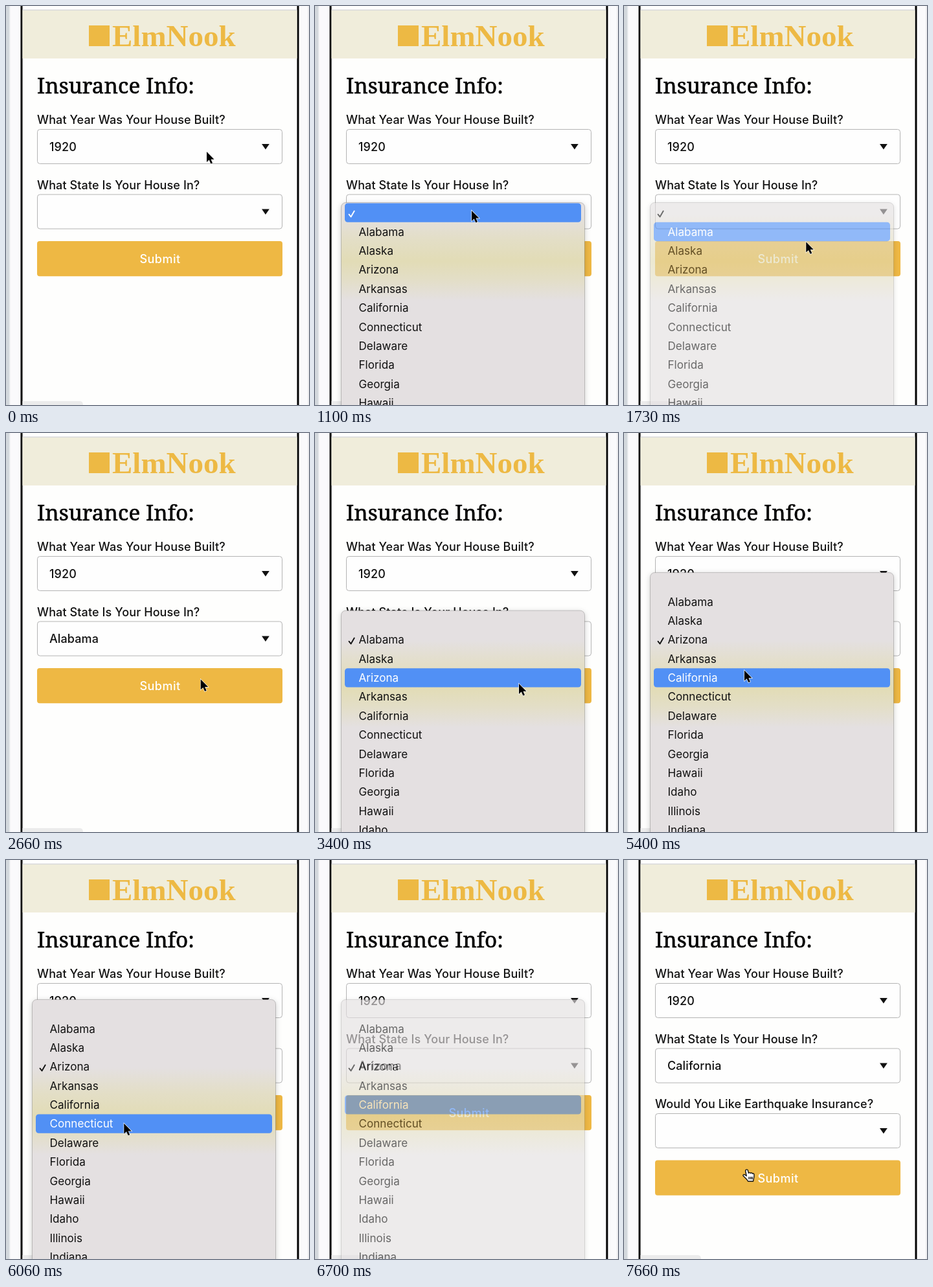
Recreate the animation shown at these times as an HTML page. Size 468 px wide and 616 px high, loop 8 s.

```html
<!DOCTYPE html>
<html lang="en">
<head>
<meta charset="utf-8">
<title>Insurance form</title>
<style>
  html, body { margin: 0; width: 100%; height: 100%; overflow: hidden; background: #fdfdfd; }
  svg { display: block; width: 468px; height: 616px; }
  text { font: 500 18px Inter, "Open Sans", sans-serif; letter-spacing: .1px; fill: #111; }
  .brand { font: bold 47px "Liberation Serif", serif; letter-spacing: 0; fill: #edb944; }
  .title { font: 33.3px "Noto Serif", serif; letter-spacing: 0; fill: #000; stroke: #000; stroke-width: .6; }
  .submit { fill: #fff; letter-spacing: .5px; text-anchor: middle; }
  .menu text { font-size: 17.1px; font-weight: 400; letter-spacing: 0; }
  .field { fill: #fefefe; stroke: #b4b4b4; }
  .panel { fill: url(#glass); stroke: #00000030; filter: drop-shadow(0 2px 4px #0003); }
  .check { fill: none; stroke: #111; stroke-width: 1.9; stroke-linecap: round; stroke-linejoin: round; }
</style>
</head>
<body>
<svg id="stage" viewBox="0 0 468 616">
  <defs>
    <linearGradient id="glass" gradientUnits="userSpaceOnUse" x1="0" y1="320" x2="0" y2="455">
      <stop offset="0" stop-color="#e4e0e1"/>
      <stop offset=".3" stop-color="#e3dec6"/>
      <stop offset=".55" stop-color="#e2dcb6"/>
      <stop offset=".75" stop-color="#e3dec6"/>
      <stop offset="1" stop-color="#e4e0e1"/>
    </linearGradient>
  </defs>
  <rect width="468" height="616" fill="#fafafc"/>
  <rect width="5" height="616" fill="#d3d8dd"/>
  <rect x="5" width="1.5" height="616" fill="#e8ebee"/>
  <rect x="466" width="2" height="616" fill="#ededf0"/>
  <rect x="24" y="-5" width="427" height="630" fill="#fefefd" stroke="#000" stroke-width="3"/>
  <rect x="25.5" y="5.5" width="424" height="1.5" fill="#d9d9d9"/>
  <rect x="25.5" y="7" width="424" height="74" fill="#f0eddb"/>
  <rect x="128" y="30" width="32" height="32" fill="#edb944"/>
  <text class="brand" x="164" y="62">ElmNook</text>
  <text class="title" x="48" y="135">Insurance Info:</text>
  <g id="form"></g>
  <path d="M25.5 616V610H114Q119 610 119 616Z" fill="#ececec"/>
  <g id="menus"></g>
  <g id="cursor">
    <path id="arrow" d="M0 0V16L3.7 12.6 6.4 18.5 9 17.4 6.5 11.7H11.5Z" fill="#000" stroke="#fff" stroke-width="1.3" paint-order="stroke"/>
    <path id="hand" d="M-2.4 2C-2.4-.6 1-.9 1.5 1.6L2.4 5.4C3.2 4.2 5 4.4 5.6 5.6 6.5 4.6 8.2 5 8.6 6.3 9.6 5.6 11 6.2 11 8 11.2 12 10 14 9.6 18H1.5C0 14.5-3 12.5-6 9.5-6.6 7.6-4.2 7-2.8 8.2L-.8 9.8ZM3.2 11V15M5.7 11V15M8 11V15" fill="#fff" stroke="#111" stroke-width="1.4" stroke-linejoin="round"/>
  </g>
</svg>
<script>
const LOOP = 8000, ROW = 29.35, FADE = 215;
const $ = id => document.getElementById(id);
const states = ['', 'Alabama', 'Alaska', 'Arizona', 'Arkansas', 'California', 'Connecticut',
  'Delaware', 'Florida', 'Georgia', 'Hawaii', 'Idaho', 'Illinois', 'Indiana'];

// time, x, y, easing into this point
const path = [
  [0, 310, 225], [20, 310, 225], [430, 240, 314, 'both'],
  [1070, 240, 314], [1260, 268, 341, 'both'],
  [1500, 268, 341], [1730, 281, 364, 'in'], [1900, 304, 393, 'out'],
  [2630, 304, 393], [2660, 301, 381], [2860, 267, 309, 'out'],
  [3230, 267, 309], [3400, 315, 387, 'both'],
  [4000, 315, 387], [4330, 331, 398, 'both'], [4830, 192, 300, 'both'],
  [5270, 192, 300], [5400, 186, 366, 'in'], [5630, 178, 435, 'out'],
  [5800, 178, 435], [6300, 186, 382, 'both'], [6500, 186, 382],
  [7490, 455, 517], [7660, 190, 478, 'out']
];
const eases = {
  in: p => p * p,
  out: p => p * (2 - p),
  both: p => p * p * (3 - 2 * p)
};

// moved: first pointer motion inside the open menu
const menus = [
  { open: 700, moved: 1080, click: 1530, fade: 1650, sel: 0 },
  { open: 3060, moved: 3240, click: 4030, fade: 4125, sel: 1 },
  { open: 5100, moved: 5290, click: 6500, fade: 6622, sel: 3 }
];
const answers = [[0, ''], [1880, 'Alabama'], [4365, 'Arizona'], [6830, 'California']];

function pointer(t) {
  const i = path.findIndex(k => k[0] > t);
  if (i < 0) return path[path.length - 1].slice(1, 3);
  const a = path[i - 1], b = path[i];
  const p = (t - a[0]) / (b[0] - a[0]);
  const e = b[3] ? eases[b[3]](p) : p;
  return [a[1] + (b[1] - a[1]) * e, a[2] + (b[2] - a[2]) * e];
}

const question = (label, y, value) => `
  <text x="48" y="${y}">${label}</text>
  <rect class="field" x="48.5" y="${y + 8.5}" width="378" height="53" rx="4"/>
  <text x="67" y="${y + 41.5}">${value}</text>
  <path d="M395 ${y + 31}h11.8l-5.9 8.6z" fill="#111"/>`;

function formMarkup(state) {
  const quake = state === 'California';
  const y = quake ? 463.5 : 363;
  return question('What Year Was Your House Built?', 182, '1920') +
    question('What State Is Your House In?', 282.5, state) +
    (quake ? question('Would You Like Earthquake Insurance?', 383, '') : '') +
    `<rect x="48" y="${y}" width="379" height="54.3" rx="4" fill="#eeb844"/>
     <text class="submit" x="238" y="${y + 34}">Submit</text>`;
}

for (const m of menus) {
  m.top = 304 - m.sel * ROW;
  const mid = k => m.top + 15.2 + k * ROW;
  const c = mid(m.sel) + 1;
  $('menus').insertAdjacentHTML('beforeend', `<g class="menu">
    <rect class="panel" x="40.5" y="${m.top - .5}" width="376" height="460" rx="7"/>
    <rect class="mark" x="46" width="365" height="29.3" rx="4.5" fill="#5190f5"/>
    <path class="check" d="M52.5 ${c + 1.5}l3 3.8 5.2-9"/>
    ${states.map((s, k) => `<text x="67.5" y="${mid(k) + 6.2}">${s}</text>`).join('')}</g>`);
  m.node = $('menus').lastElementChild;
  m.mark = m.node.querySelector('.mark');
  m.check = m.node.querySelector('.check');
  m.rows = [...m.node.querySelectorAll('text')];
}

function drawMenu(m, t) {
  const shown = t >= m.open && t < m.fade + FADE;
  m.node.style.display = shown ? '' : 'none';
  if (!shown) return;
  m.node.style.opacity = Math.min(1, 1 - (t - m.fade) / FADE);
  const y = pointer(Math.min(t, m.click - 40))[1];
  const row = t < m.moved ? m.sel : Math.floor((y - m.top - .5) / ROW);
  const lit = t < m.click || t > m.click + 70;
  m.mark.setAttribute('y', m.top + .5 + row * ROW);
  m.mark.style.display = lit ? '' : 'none';
  m.rows.forEach((r, k) => r.style.fill = lit && k === row ? '#fff' : '');
  m.check.style.stroke = lit && row === m.sel ? '#fff' : '';
}

let current = null;
function draw(t) {
  const state = answers.filter(a => a[0] <= t).pop()[1];
  if (state !== current) $('form').innerHTML = formMarkup(current = state);
  menus.forEach(m => drawMenu(m, t));

  const [x, y] = pointer(t);
  const hand = t > 4200 && t < 4830 && y > 363 || t >= 7490 && x < 427;
  $('cursor').style.display = t >= 6500 && t < 7490 ? 'none' : '';
  $('cursor').setAttribute('transform', `translate(${x} ${y})`);
  $('arrow').style.display = hand ? 'none' : '';
  $('hand').style.display = hand ? '' : 'none';
}

const start = performance.now();
function tick() {
  draw((performance.now() - start) % LOOP);
  requestAnimationFrame(tick);
}
tick();
</script>
</body>
</html>
```
